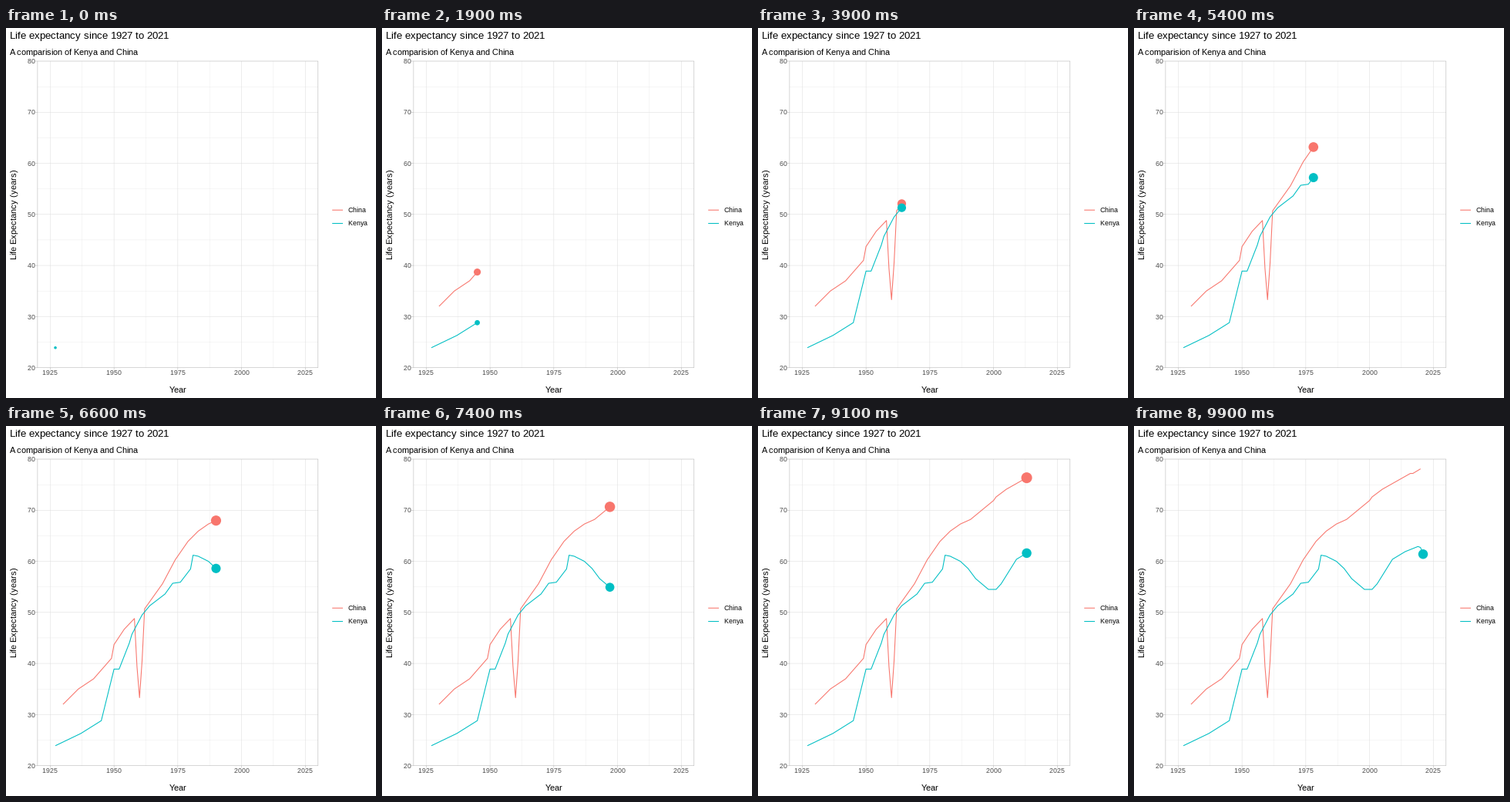
These frames come from a looping animation (480 px wide and 480 px high, 10000 ms). A matplotlib script:

```python
import matplotlib.pyplot as plt
import numpy as np
from matplotlib.animation import FuncAnimation
from matplotlib.patches import Circle, PathPatch, Rectangle
from matplotlib.textpath import TextPath
from matplotlib.transforms import Affine2D

SIZE, DPI = 480, 72          # at 72 dpi one point is one pixel
FRAMES, INTERVAL = 100, 100
FIRST, LAST = 1927, 2021
YEARLY = 1950                # from here on there is a value for every year
LOW, HIGH = 23.9, 78.1
FONT = "Liberation Sans"
LEFT, RIGHT, TOP, BOTTOM = 40.9, 404.8, 43.0, 440.6
LINE = 1.07

# Turning points of each curve: (year, life expectancy)
CHINA = [(1930, 32), (1936, 35), (1942, 37), (1949, 41), (1950, 43.7),
         (1954, 46.7), (1958, 48.8), (1959, 39.4), (1960, 33.3),
         (1961, 40.5), (1962, 50.7), (1969, 55.6), (1974, 60.3),
         (1979, 63.9), (1983, 65.9), (1987, 67.3), (1991, 68.2),
         (2000, 71.9), (2001, 72.6), (2005, 74.1), (2016, 77.2),
         (2017, 77.2), (2020, HIGH)]
KENYA = [(1927, LOW), (1937, 26.3), (1945, 28.8), (1950, 38.9),
         (1952, 38.9), (1956, 44.0), (1957, 45.7), (1961, 49.5),
         (1964, 51.3), (1970, 53.6), (1973, 55.7), (1976, 55.9),
         (1980, 58.5), (1981, 61.2), (1983, 61.0), (1987, 60.0),
         (1990, 58.6), (1993, 56.6), (1998, 54.5), (2001, 54.5),
         (2003, 55.6), (2009, 60.4), (2014, 61.9), (2019, 62.9),
         (2020, 62.7), (2021, 61.4)]


def px(year):
    return LEFT + (np.asarray(year) - 1920) / 110 * (RIGHT - LEFT)


def py(value):
    return BOTTOM - (np.asarray(value) - 20) / 60 * (BOTTOM - TOP)


def dot_radius(value):
    """Dot area grows with the value, from size 1 to size 6."""
    size = 1 + 5 * np.sqrt((np.asarray(value) - LOW) / (HIGH - LOW))
    return 0.375 * (size * 2.845 + 0.945) + 0.354


fig = plt.figure(figsize=(SIZE / DPI, SIZE / DPI), dpi=DPI, facecolor="white")
ax = fig.add_axes([0, 0, 1, 1])
ax.set_xlim(0, SIZE)
ax.set_ylim(SIZE, 0)
ax.axis("off")


# Text is set on whole-pixel advances.
def glyphs(s, size):
    return TextPath((0, 0), s, size=size, prop={"family": FONT})


def natural(s, size):
    def span(t):
        return glyphs(t, 100).get_extents().width
    return (span(f"|{s}|") - span("||")) * size / 100


def snap(v):
    return int(np.floor(v + 0.501))


def layout(s, size):
    """Pen offset of every character, then the total width."""
    pens = [0]
    for a, b in zip(s, s[1:] + " "):
        kern = natural(a + b, size) - natural(a, size) - natural(b, size)
        pens.append(pens[-1] + snap(natural(a, size)) + snap(kern))
    return pens


def write(x, y, s, size, color="black", align=0.0):
    pens = layout(s, size)
    # The renderer rounds pen plus bearing; the shift makes it round down.
    x0 = snap(x - align * pens[-1]) - 0.48
    for c, pen in zip(s, pens):
        if c != " ":
            ax.text(x0 + pen, y, c, size=size, color=color, family=FONT,
                    ha="left", va="baseline")


def write_up(x, y, s, size):
    pens = layout(s, size)
    y0 = snap(y + pens[-1] / 2)
    for c, pen in zip(s, pens):
        if c != " ":
            turn = Affine2D([[0, -1, x], [-1, 0, y0 - pen], [0, 0, 1]])
            ax.add_patch(PathPatch(glyphs(c, size).transformed(turn),
                                   fc="black", lw=0, snap=False))


def rule(xs, ys, color, width, z=1):
    ax.plot(xs, ys, color=color, lw=width, zorder=z, snap=False,
            solid_capstyle="butt")


# Grid, ticks and border
GRID, EDGE, LABEL = "#DEDEDE", "#B3B3B3", "#4D4D4D"
for year in np.arange(1937.5, 2025, 25):
    rule([px(year)] * 2, [TOP, BOTTOM], GRID, LINE / 4)
for value in range(25, 80, 10):
    rule([LEFT, RIGHT], [py(value)] * 2, GRID, LINE / 4)
for year in range(1925, 2026, 25):
    rule([px(year)] * 2, [TOP, BOTTOM], GRID, LINE / 2)
    rule([px(year)] * 2, [BOTTOM, BOTTOM + 2.75], EDGE, LINE / 2)
    write(px(year), 450, str(year), 8.8, LABEL, 0.5)
for value in range(20, 81, 10):
    if 20 < value < 80:
        rule([LEFT, RIGHT], [py(value)] * 2, GRID, LINE / 2)
    rule([LEFT - 2.75, LEFT], [py(value)] * 2, EDGE, LINE / 2)
    write(38, snap(py(value) + 3.2), str(value), 8.8, LABEL, 1)
ax.add_patch(Rectangle((LEFT, TOP), RIGHT - LEFT, BOTTOM - TOP, fill=False,
                       ec=EDGE, lw=LINE / 2, snap=False, zorder=6))

write(5, 14, "Life expectancy since 1927 to 2021", 13.2)
write(5, 35, "A comparision of Kenya and China", 11)
write((LEFT + RIGHT) / 2, 473, "Year", 11, align=0.5)
write_up(13, (TOP + BOTTOM) / 2 + 0.5, "Life Expectancy (years)", 11)


class Series:
    def __init__(self, name, points, color, key_y):
        turns, levels = np.array(points).T
        years = np.append(turns[turns < YEARLY],
                          np.arange(YEARLY, turns[-1] + 1))
        values = np.interp(years, turns, levels)
        self.keys = np.round((years - FIRST) * (FRAMES - 1) / (LAST - FIRST))
        self.x, self.y, self.r = px(years), py(values), dot_radius(values)
        self.line, = ax.plot([], [], color=color, lw=LINE, zorder=3,
                             solid_capstyle="butt", solid_joinstyle="round")
        self.dot = ax.add_patch(Circle((0, 0), 1, fc=color, lw=0, zorder=5))
        rule([423.2, 437], [key_y] * 2, color, LINE)
        write(444, snap(key_y + 2.7), name, 8.8)

    def show(self, n):
        x, y, r = (np.interp(n, self.keys, v) for v in (self.x, self.y, self.r))
        past = self.keys <= n
        self.line.set_data(np.append(self.x[past], x), np.append(self.y[past], y))
        self.line.set_visible(n >= self.keys[0])
        self.dot.set_center((x, y))
        self.dot.set_radius(r)
        self.dot.set_visible(self.keys[0] <= n <= self.keys[-1])


series = [Series("China", CHINA, "#F8766D", 236.2),
          Series("Kenya", KENYA, "#00BFC4", 253.5)]


def update(n):
    for s in series:
        s.show(n)
    return [a for s in series for a in (s.line, s.dot)]


anim = FuncAnimation(fig, update, frames=FRAMES, interval=INTERVAL,
                     init_func=lambda: update(0), repeat=True, repeat_delay=0)
plt.show()
```
